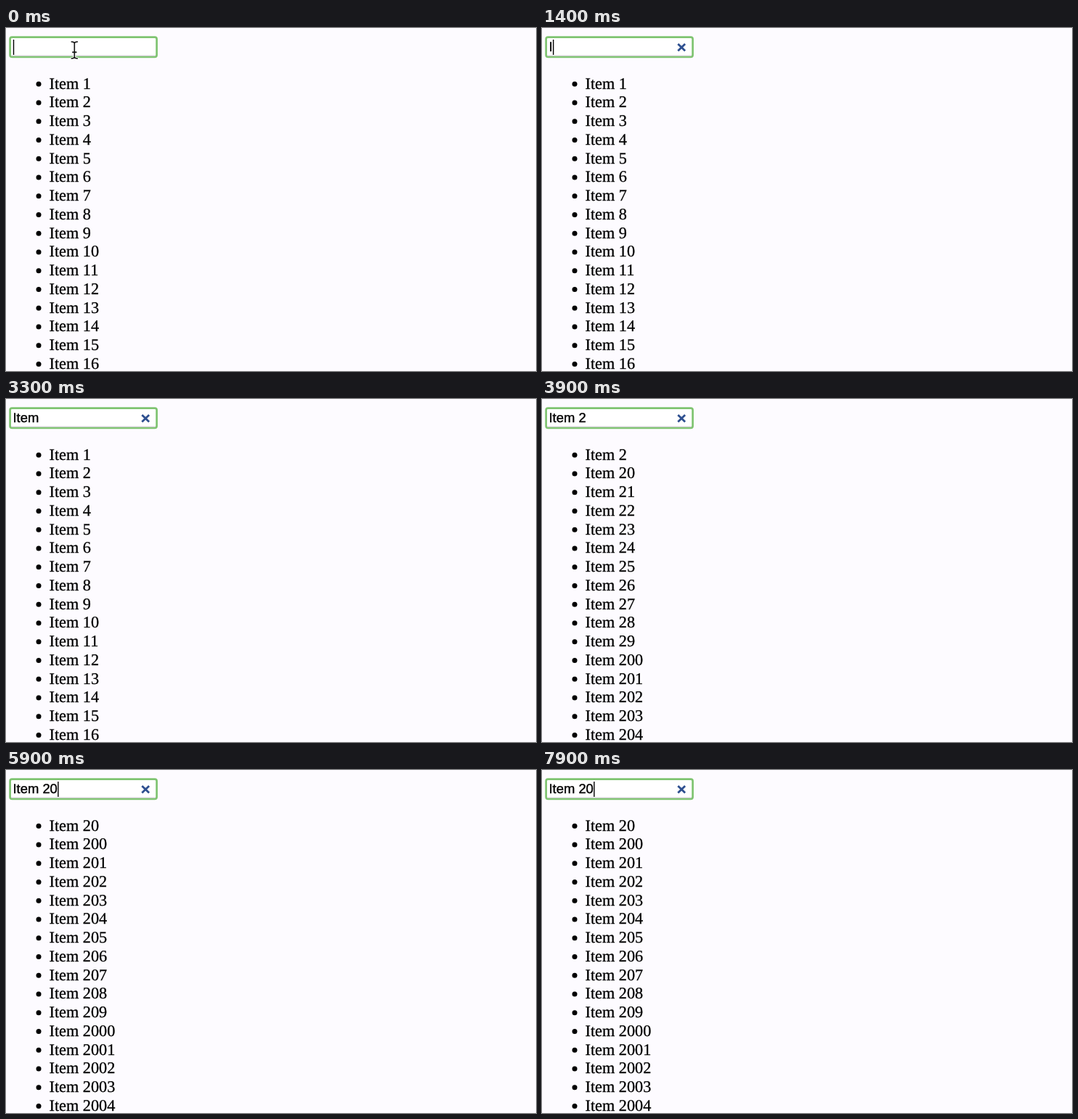
These frames come from a looping animation (730x473 px, 8 s). An HTML page:

```html
<!DOCTYPE html>
<html lang="en">
<head>
<meta charset="utf-8">
<title>Filtered list</title>
<style>
  html, body { margin: 0; width: 100%; height: 100%; overflow: hidden; background: #fdfbff; }
  svg { display: block; width: 730px; height: 473px; }
  text { white-space: pre; fill: #000; stroke: #000; text-rendering: geometricPrecision; }
  #list text { font: 22.25px "Liberation Serif", Times, serif; stroke-width: .3; }
  #query { font: 18.4px "Liberation Sans", Helvetica, sans-serif; stroke-width: .4; }
  .ring { fill: #fff; stroke: #7fc471; stroke-width: 2.7; }
  .edge { stroke: #c4c4c8; stroke-width: 1; }
  #clear { stroke: #2d4f8f; stroke-width: 2.8; }
  #pointer { fill: none; stroke-linecap: round; stroke-linejoin: round; }
</style>
</head>
<body>
<svg viewBox="0 0 730 473">
  <rect class="ring" x="5.6" y="12.6" width="202" height="27.4" rx="2.7"/>
  <path class="edge" d="M7 38.2H206"/>
  <text id="query" x="9.5" y="32.2"></text>
  <rect id="caret" y="16" width="1.4" height="21"/>
  <path id="clear" d="M187.3 22L197.1 31.6M197.1 22L187.3 31.6"/>
  <g id="pointer">
    <path id="beam" stroke="#fff" stroke-width="3.6"
      d="M90.2 19Q94.3 19 94.3 21.5Q94.3 19 98.4 19M94.3 21.5V39.5M90.2 42Q94.3 42 94.3 39.5Q94.3 42 98.4 42M91.8 33.4H96.8"/>
  </g>
  <g id="list"></g>
</svg>
<script>
  const LOOP = 8000, ROWS = 16, PITCH = 25.75;
  const HIDE_POINTER = 700;

  // [time, text in the field]
  const typing = [
    [0, ""], [1200, "I"], [1600, "It"], [1700, "Ite"], [1900, "Item "],
    [3400, "Item 2"], [4900, "Item 20"], [6500, "Item 201"], [7900, "Item 20"]
  ];
  // The caret starts visible and flips at each of these times.
  const blinks = [400, 900, 2300, 2800, 3300, 3400, 3900, 4400, 5400, 5900, 6400, 6500, 7000, 7500];

  const $ = id => document.getElementById(id);
  const make = (tag, attrs, parent) => {
    const el = document.createElementNS("http://www.w3.org/2000/svg", tag);
    for (const name in attrs) el.setAttribute(name, attrs[name]);
    return parent.appendChild(el);
  };
  const show = (el, on) => { el.style.display = on ? "" : "none"; };

  // Dark core of the pointer, drawn over its light outline.
  make("path", { d: $("beam").getAttribute("d"), stroke: "#111", "stroke-width": 1.6 }, $("pointer"));

  const items = Array.from({ length: 3000 }, (_, i) => "Item " + (i + 1));
  const rows = Array.from({ length: ROWS }, (_, i) => {
    const g = make("g", { transform: `translate(0 ${i * PITCH})` }, $("list"));
    make("circle", { cx: 45, cy: 77.3, r: 3.5 }, g);
    const label = make("text", { x: 59.5, y: 83.7 }, g);
    return { g, label };
  });

  let shown = null;
  function setQuery(text) {
    if (text === shown) return;
    shown = text;
    $("query").textContent = text;
    const width = text ? $("query").getComputedTextLength() : 0;
    $("caret").setAttribute("x", 9.8 + width);
    show($("clear"), text);
    const found = items.filter(item => item.includes(text));
    rows.forEach(({ g, label }, i) => {
      show(g, i < found.length);
      label.textContent = found[i] || "";
    });
  }

  function draw(now) {
    const t = now % LOOP;
    setQuery(typing.filter(([at]) => at <= t).pop()[1]);
    show($("caret"), blinks.filter(at => at <= t).length % 2 === 0);
    show($("pointer"), t < HIDE_POINTER);
  }

  let start;
  function tick(now) {
    start ??= now;
    draw(Math.max(0, now - start));
    requestAnimationFrame(tick);
  }
  draw(0);
  requestAnimationFrame(tick);
</script>
</body>
</html>
```
